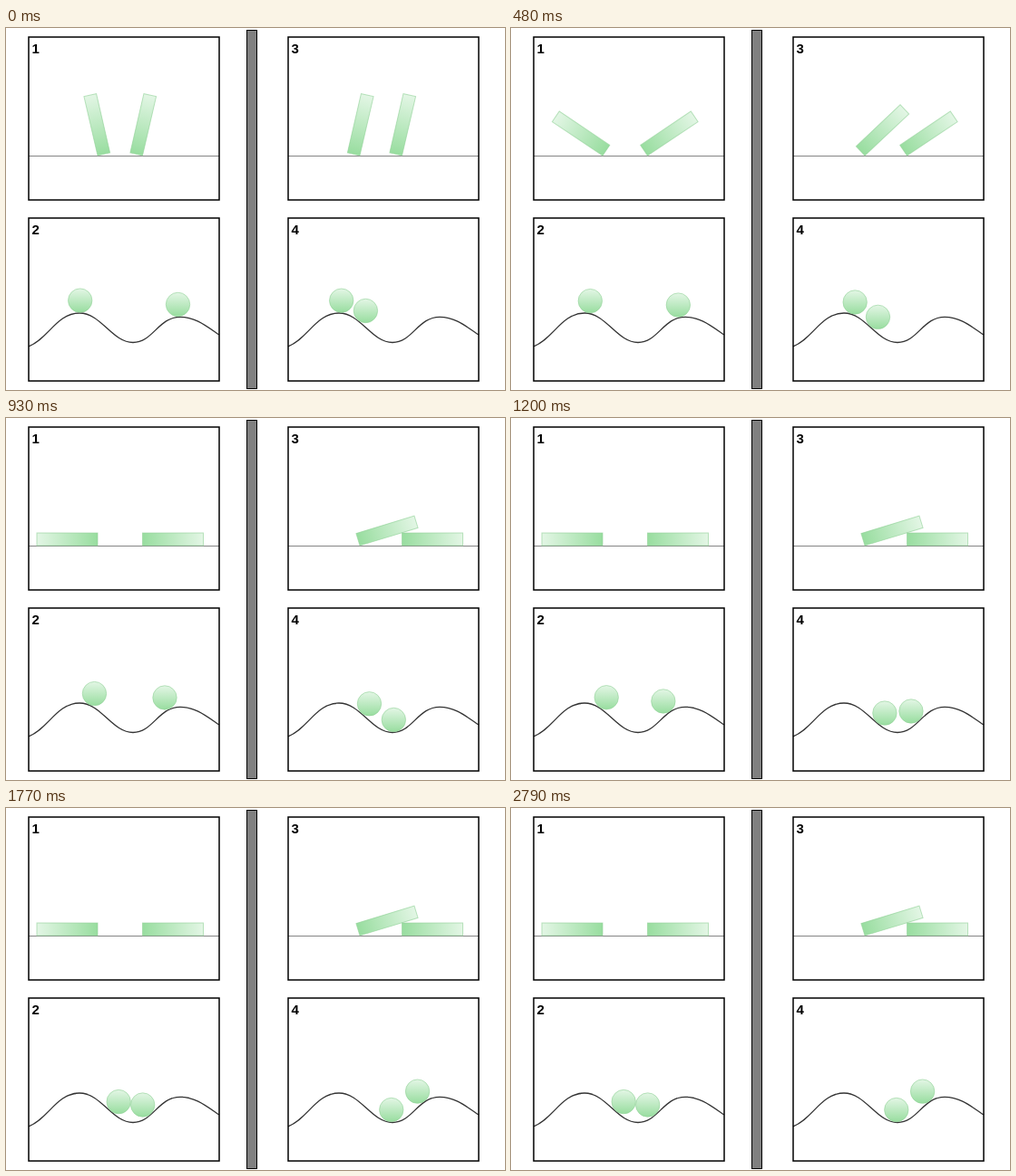
Animation of 550 by 400 pixels, one loop 2.82 s. Source, as an HTML page:

```html
<!DOCTYPE html>
<html lang="en">
<head>
<meta charset="utf-8">
<title>Falling blocks and rolling balls</title>
<style>
  html, body { margin: 0; width: 100%; height: 100%; overflow: hidden; background: #fff; }
  svg { display: block; width: 550px; height: 400px; }
  text { font: bold 15px "Liberation Sans", Arial, sans-serif; }
  .frame { fill: none; stroke: #000; stroke-width: 1.5; }
  .ground { stroke: #858585; }
  .hill { fill: none; stroke: #333; stroke-width: 1.3; }
  .body { fill: url(#green); stroke: #8fd097; stroke-opacity: .6; }
</style>
</head>
<body>
<svg id="stage" viewBox="0 0 550 400">
  <defs>
    <linearGradient id="green" x1="0" y1="0" x2="0" y2="1">
      <stop offset="0" stop-color="#e3f6e5"/>
      <stop offset="1" stop-color="#98dd9f"/>
    </linearGradient>
  </defs>
  <rect x="265.5" y="2.5" width="11" height="396" fill="#808080" stroke="#000"/>
</svg>
<script>
const LOOP = 2820, STEP = 30;
const FALL_TIME = 766, ROLL_TIME = 1770;
const COLUMN = 286, RADIUS = 13.2, CLEARANCE = 13.9;
const HILL = 'M25 351.8C46 344 56 315 81 315C105 315 117 347.5 140 347.5' +
  'C162 347.5 168 319.3 192 319.3C208 319.3 219 328 235 339';

const stage = document.getElementById('stage');

function add(tag, attrs, parent = stage) {
  const el = document.createElementNS('http://www.w3.org/2000/svg', tag);
  for (const key in attrs) el.setAttribute(key, attrs[key]);
  return parent.appendChild(el);
}

const lerp = (a, b, p) => a + (b - a) * p;

function accelerate(t, duration, strength) {
  const u = Math.min(t / duration, 1);
  return u * (1 - strength) + u * u * strength;
}

// Each knot is [time, progress, speed].
const SWING = [[0, 0, 0], [720, .333, 9.25e-4], [1200, .768, 7.5e-4], [1800, 1, 0]];

function swing(t) {
  const i = SWING.findIndex(knot => t < knot[0]);
  if (i < 0) return 1;
  const [t0, p0, v0] = SWING[i - 1], [t1, p1, v1] = SWING[i];
  const h = t1 - t0, u = (t - t0) / h, w = 1 - u;
  return p0 * w * w * (1 + 2 * u) + p1 * u * u * (3 - 2 * u) +
    h * u * w * (v0 * w - v1 * u);
}

// Line followed by the centre of a ball resting on the hill.
function offsetPath(hill) {
  const length = hill.getTotalLength(), points = [];
  for (let s = 1; s < length - 1; s++) {
    const a = hill.getPointAtLength(s - .5), b = hill.getPointAtLength(s + .5);
    const dx = b.x - a.x, dy = b.y - a.y, k = CLEARANCE / Math.hypot(dx, dy);
    points.push(`${(a.x + b.x) / 2 + dy * k} ${(a.y + b.y) / 2 - dx * k}`);
  }
  return add('path', { d: 'M' + points.join('L'), fill: 'none' });
}

function lengthAtX(path, x) {
  let low = 0, high = path.getTotalLength();
  for (let i = 0; i < 24; i++) {
    const mid = (low + high) / 2;
    if (path.getPointAtLength(mid).x < x) low = mid; else high = mid;
  }
  return low;
}

let hill;
for (let i = 0; i < 4; i++) {
  const x = 25 + (i >> 1) * COLUMN, y = 10 + (i & 1) * 200;
  if (i & 1) {
    hill = add('path', { d: HILL, class: 'hill', transform: `translate(${x - 25} 0)` });
  } else {
    add('path', { d: `M${x} 141.5h210`, class: 'ground' });
  }
  add('rect', { x, y, width: 210, height: 180, class: 'frame' });
  add('text', { x: x + 3.5, y: y + 18 }).textContent = i + 1;
}
const track = offsetPath(hill);

function block(pivot, side, endAngle) {
  const el = add('rect', { x: -14, y: -67, width: 14, height: 67, class: 'body' });
  return t => {
    const angle = lerp(13, endAngle, accelerate(t, FALL_TIME, .287));
    el.setAttribute('transform', `translate(${pivot} 141) scale(${side} 1) rotate(${angle})`);
  };
}

function ball(shift, fromX, toX, progress) {
  const el = add('circle', { r: RADIUS, class: 'body' });
  const from = lengthAtX(track, fromX), to = lengthAtX(track, toX);
  return t => {
    const { x, y } = track.getPointAtLength(lerp(from, to, progress(t)));
    el.setAttribute('cx', x + shift);
    el.setAttribute('cy', y);
  };
}

const roll = t => accelerate(t, ROLL_TIME, .8);
const movers = [
  block(101, -1, 90),
  block(150.5, 1, 90),
  block(390, 1, 73),
  block(436.5, 1, 90),
  ball(0, 81.7, 124.2, roll),
  ball(0, 189.5, 150.7, roll),
  ball(COLUMN, 83.7, 138.8, swing),
  ball(COLUMN, 110.4, 167.6, swing)
];

const start = performance.now();
function draw() {
  const elapsed = (performance.now() - start) % LOOP;
  const t = Math.floor(elapsed / STEP) * STEP;
  movers.forEach(move => move(t));
  requestAnimationFrame(draw);
}
draw();
</script>
</body>
</html>
```
